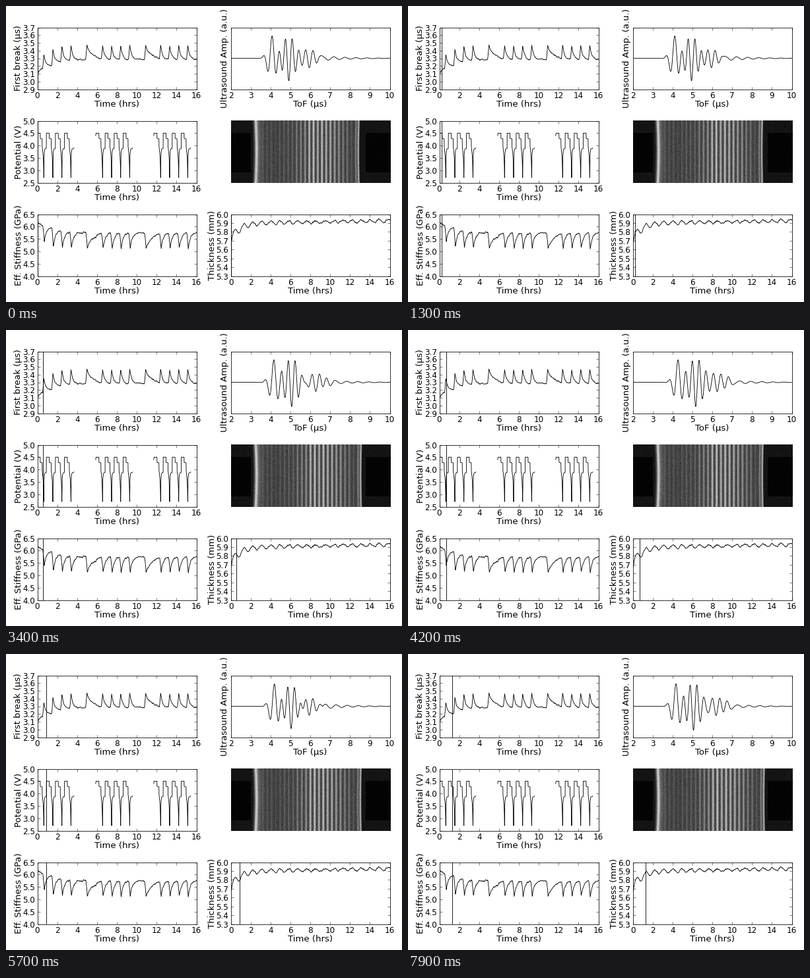
Animation of 600x450 px, one loop 8000 ms. Source, as a matplotlib script:

```python
import numpy as np
import matplotlib.pyplot as plt
from matplotlib.animation import FuncAnimation

W, H, PT = 600, 450, 0.72
FRAMES, INTERVAL = 80, 100
HOURS_PER_FRAME = 0.0163
COLS, ROWS = (47.5, 340.5), (32.5, 174.5, 316.5)
AX_W, AX_H = 241, 94

plt.rcParams.update({
    "font.family": "DejaVu Sans", "font.size": 12 * PT,
    "axes.linewidth": 0.8 * PT, "lines.linewidth": 0.85 * PT,
    "xtick.direction": "in", "ytick.direction": "in",
    "xtick.top": True, "ytick.right": True,
    "xtick.major.size": 3.7 * PT, "ytick.major.size": 3.7 * PT,
    "xtick.major.width": 0.5 * PT, "ytick.major.width": 0.5 * PT,
    "xtick.major.pad": 3.8 * PT, "ytick.major.pad": 3.5 * PT,
})
fig = plt.figure(figsize=(W / 100, H / 100), dpi=100, facecolor="white")
rng = np.random.default_rng(4)


def label(x, y, text, rotation=0):
    fig.text(x / W, 1 - y / H, text, ha="center", va="center",
             rotation=rotation, fontsize=13.2 * PT)


def panel(col, row, xlabel, ylabel, label_x, xlim, ylim, step):
    x, y = COLS[col], ROWS[row]
    ax = fig.add_axes([x / W, 1 - (y + AX_H) / H, AX_W / W, AX_H / H])
    ax.set(xlim=xlim, ylim=ylim)
    ax.set_xticks(np.arange(xlim[0], xlim[1] + 1, 1 if xlim[0] else 2))
    if step:
        ax.set_yticks(np.arange(ylim[0], ylim[1] + step / 2, step))
        ax.yaxis.set_major_formatter("{x:.1f}")
    else:
        ax.set_yticks([])
    label(x + AX_W / 2, y + AX_H + 22.5, xlabel)
    label(label_x, y + AX_H / 2, ylabel, 90)
    return ax


def bump(x, centre, width):
    return np.exp(-((x - centre) / width) ** 2)


def wobble(size):
    noise = np.convolve(rng.normal(size=T.size + 6), np.ones(7) / 7, "valid")
    return noise * size


# Three groups of four charge cycles, the first two followed by a slow one.
PERIOD, GROUPS = 0.91, (0.65, 6.56, 12.4)
T = np.linspace(0, 16, 800)
PULSES = [(g + PERIOD * k, False) for g in GROUPS for k in range(4)]
PULSES += [(g + PERIOD * 3 + 1.6, True) for g in GROUPS[:2]]
PULSES.sort()


def pulse_curve(start, ready, rest, peak, lead, tau, delay, noise):
    """Pulses whose rest and peak levels settle from a first to a final value."""
    y = start + (ready - start) * np.clip(T / 0.4, 0, 1)
    for p, slow in PULSES:
        settle = np.exp(-(p - GROUPS[0]))
        base, top = (end + (first - end) * settle for first, end in (rest, peak))
        d = T - p - delay
        rise, fall = (d > -lead) & (d < 0), d >= 0
        before = y[rise][0]
        y[rise] = before + (top - before) * (1 + d[rise] / lead) ** 1.5
        decay = np.exp(-d[fall] / tau)
        if slow:
            decay = 0.55 * decay + 0.45 * bump(d[fall], 0, 1)
        y[fall] = base + (top - base) * decay
    return y + wobble(noise)


def potential():
    u = np.linspace(0, 1, 12)
    dx = np.concatenate([[-0.65, -0.37, -0.36, -0.17], -0.16 + 0.16 * u, 0.03 + 0.22 * u])
    v = np.concatenate([[4.5, 4.5, 4.29, 4.27], 3.95 - 0.55 * u - 0.7 * u ** 5,
                        3.88 - 0.28 * np.exp(-6 * u)])
    x, y = [], []
    for g in GROUPS:
        if g > 1:
            x, y = x + [g - 0.7], y + [4.4]
        for k in range(4):
            x, y = x + list(g + PERIOD * k + dx), y + list(v)
        x, y = x + [x[-1] + 0.05, np.nan], y + [3.9, np.nan]
    return x, y


first_break = pulse_curve(3.10, 3.17, (3.20, 3.285), (3.35, 3.47), 0.14, 0.19, 0, 0.012)
stiffness = pulse_curve(6.18, 6.05, (5.99, 5.75), (5.37, 5.10), 0.17, 0.21, 0.05, 0.05)
swell = (5.90 + 0.0015 * T - 0.19 * np.exp(-T / 0.9)
         + (0.015 + 0.035 * np.exp(-T / 2)) * np.cos(2 * np.pi * (T - 0.4) / PERIOD))
thickness = swell + wobble(0.013)

day, hrs = (0, 16), "Time (hrs)"
ax_break = panel(0, 0, hrs, "First break (µs)", 19, day, (2.9, 3.7), 0.1)
ax_volt = panel(0, 1, hrs, "Potential (V)", 19.5, day, (2.5, 5.0), 0.5)
ax_stiff = panel(0, 2, hrs, "Eff. Stiffness (GPa)", 19.5, day, (4.0, 6.5), 0.5)
ax_wave = panel(1, 0, "ToF (µs)", "Ultrasound Amp. (a.u.)", 331.5, (2, 10), (-47, 47), None)
ax_thick = panel(1, 2, hrs, "Thickness (mm)", 312.5, day, (5.3, 6.0), 0.1)

ax_break.plot(T, first_break, "k")
ax_volt.plot(*potential(), "k")
ax_stiff.plot(T, stiffness, "k")
ax_thick.plot(T, thickness, "k")
cursors = [ax.axvline(0, color="k", lw=0.85 * PT)
           for ax in (ax_break, ax_volt, ax_stiff, ax_thick)]
wave, = ax_wave.plot([], [], "k")

TOF = np.linspace(2, 10, 960)


def packet(centre, amp, width, freq):
    return amp * bump(TOF, centre, width) * np.cos(2 * np.pi * freq * (TOF - centre))


def waveform(hour):
    """Three echoes and a ringing tail, delayed and strained by each cycle."""
    k = 0.5 - 0.5 * np.cos(2 * np.pi * (hour - 0.1) / PERIOD)
    k = k * k * (3 - 2 * k)
    delay = 0.85 * (np.interp(hour, T, first_break) - 3.10)
    late = np.clip(TOF - 6.5 - delay, 0, None)
    tail = 4 * np.exp(-late / 1.3) * np.sin(2 * np.pi * 1.8 * late)
    return (packet(4.08 + delay, 33, 0.30, 2.2)
            + packet(4.92 + delay + 0.06 * k, -34 - 3 * k, 0.45 + 0.05 * k, 2.9)
            + packet(5.94 + 0.34 * k, -14, 0.45 + 0.12 * k, 2.65) + tail)


# Radiograph: layered cell that swells to the right with its thickness.
IMG_X, IMG_Y, IMG_W, IMG_H = 341, 174, 242, 95
gx, gy = np.meshgrid(np.arange(IMG_W) + IMG_X + 0.5, np.arange(IMG_H) + 0.5)
bow = 1.2 * np.sin(np.pi * gy / IMG_H)
layers = np.arange(389.2, 530, 6.4)
gains = (18 + 105 * bump(layers, 476, 33)) * rng.uniform(0.7, 1.25, layers.size)


def radiograph(hour, seed):
    grow = np.interp(hour, T, swell) / swell[0] - 1
    x = 378 + (gx - 378) / (1 + 0.8 * grow)
    cell = 62 + 4 * np.sin(x * 1.9)
    for centre, gain in zip(layers, gains):
        cell += gain * bump(x, centre, 1.6)
    left, right = 372.5 + bow, 536.5 - 0.5 * bow
    cell += 100 * bump(x, left + 6, 2) + 45 * bump(x, left + 7, 6)
    cell += 110 * bump(x, right - 2, 1.4) + 60 * bump(x, right - 6, 1.5)
    inside = np.clip((x - left) / 4, 0, 1) * np.clip(right - x, 0, 1)
    holder = (gy > 19) & (gy < 79) & ((gx < 371) | (gx > 545))
    outside = np.where(holder, 4, 20)
    grain = np.random.default_rng(seed).normal(size=gx.shape)
    img = outside * (1 - inside) + cell * inside
    return img + grain * np.where(inside > 0.5, 6, np.where(holder, 1.5, 3))


ax_img = fig.add_axes([IMG_X / W, 1 - (IMG_Y + IMG_H) / H, IMG_W / W, IMG_H / H])
ax_img.axis("off")
scan = ax_img.imshow(radiograph(0, 0), cmap="gray", vmin=0, vmax=255,
                     aspect="auto", interpolation="nearest")


def update(i):
    hour = i * HOURS_PER_FRAME
    for line in cursors:
        line.set_xdata([hour, hour])
    wave.set_data(TOF, waveform(hour))
    scan.set_data(radiograph(hour, i))
    return [*cursors, wave, scan]


anim = FuncAnimation(fig, update, frames=FRAMES, interval=INTERVAL,
                     repeat=True, repeat_delay=0, blit=False)
plt.show()
```
